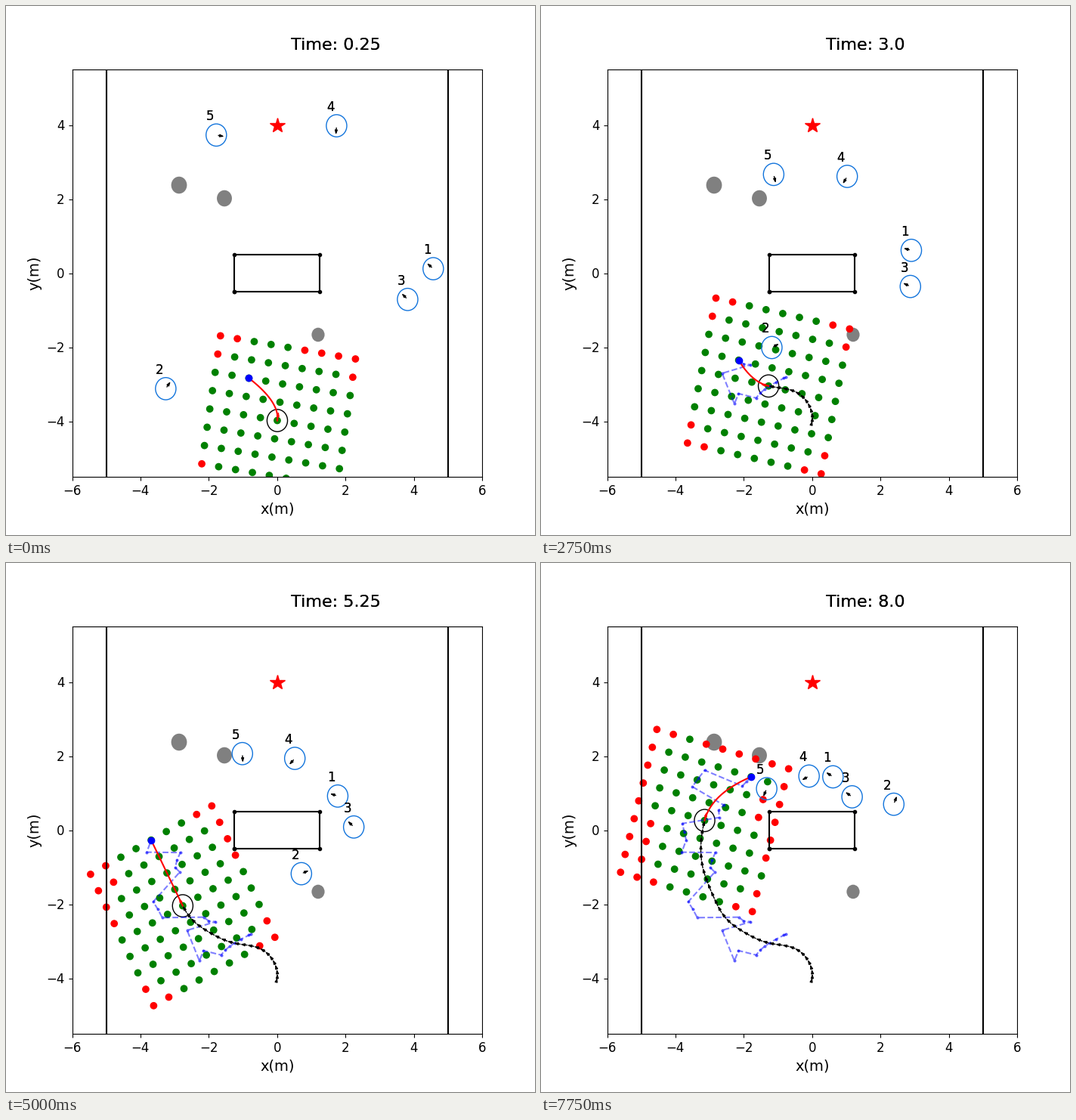
A matplotlib script that plays this animation: 700x700 px, repeating every 8 s.

```python
import numpy as np
import matplotlib.pyplot as plt
from matplotlib.animation import FuncAnimation
from matplotlib.patches import ArrowStyle, Circle, FancyArrowPatch

STEPS = 32
DT = 0.25
RADIUS = 0.3
MARGIN = 0.4
WALL_X = 5
BOX_X, BOX_Y = 1.25, 0.5
OBSTACLES = [(-2.87, 2.377, 0.23), (-1.543, 2.02, 0.22), (1.2, -1.663, 0.19)]
HEAD = ArrowStyle("-|>", head_length=3, head_width=1)
HUMAN_COLOR = "#1274dc"

steps = np.arange(STEPS + 1)


def unit(deg):
    rad = np.radians(deg)
    return np.stack([np.cos(rad), np.sin(rad)], axis=-1)


def hermite(t, keys, pts, slopes):
    i = np.clip(np.searchsorted(keys, t, side="right") - 1, 0, len(keys) - 2)
    h = (keys[i + 1] - keys[i])[:, None]
    u = (t - keys[i])[:, None] / h
    return ((1 + 2 * u) * (1 - u) ** 2 * pts[i]
            + u * (1 - u) ** 2 * h * slopes[i]
            + u * u * (3 - 2 * u) * pts[i + 1]
            + u * u * (u - 1) * h * slopes[i + 1])


def travel(keys, pts, slopes):
    """Position and facing at every step of a smooth path."""
    pos = hermite(steps, keys, pts, slopes)
    move = hermite(steps + 1e-3, keys, pts, slopes) - pos
    return pos, move / np.linalg.norm(move, axis=1, keepdims=True)


# Robot waypoints: step, x, y, heading
way = np.array([(0, 0, -4, 78), (1, 0.005, -3.98, 81),
                (8, -0.503, -3.194, 157), (12, -1.275, -3.047, 168),
                (17, -2.205, -2.633, 149.3), (21, -2.763, -2.043, 117.5),
                (25, -3.136, -1.224, 110.8), (32, -3.147, 0.26, 74.6)])
speed = np.interp(way[:, 0], [0, 1, 8, 21], [0.02, 0.1, 0.18, 0.215])
robot, ahead = travel(way[:, 0], way[:, 1:3],
                      speed[:, None] * unit(way[:, 3]))

# Chosen subgoal at each step, as (forward, left) of the robot
HARD_LEFT, LEFT, AHEAD = (1, 1), (1.5, 1), (2, 0)
NEAR, RIGHT = (1, -0.5), (1.5, -1)
node = np.array([HARD_LEFT] * 7 + [LEFT] * 2 + [AHEAD] + [NEAR] * 3
                + [AHEAD] * 3 + [RIGHT] * 4 + [AHEAD] * 4
                + [RIGHT] * 3 + [AHEAD] * 3 + [RIGHT] * 3)


def to_world(k, local):
    fx, fy = ahead[k]
    return robot[k] + local @ np.array([(fx, fy), (-fy, fx)])


goals = np.array([to_world(k, node[k]) for k in steps])

axis = np.linspace(-2, 2, 9)
grid = np.array([(f, l) for f in axis for l in axis])
too_far = np.hypot(*grid.T) > 2.49


def blocked(pts):
    x, y = pts.T
    bad = too_far | (np.abs(x) > WALL_X - MARGIN)
    bad |= np.hypot(np.maximum(np.abs(x) - BOX_X, 0),
                    np.maximum(np.abs(y) - BOX_Y, 0)) < MARGIN
    for ox, oy, r in OBSTACLES:
        bad |= np.hypot(x - ox, y - oy) < r + MARGIN
    return bad


# Humans: starting direction and a few waypoints at shared steps
human_keys = np.array([1, 8, 17, 25, 32])
HUMANS = [
    (141, [(4.57, 0.12), (3.48, 0.46), (2.24, 0.79), (1.34, 1.07),
           (0.61, 1.44)]),
    (54, [(-3.26, -3.12), (-2.01, -2.42), (-0.11, -1.5), (1.45, -0.74),
          (2.39, 0.7)]),
    (137, [(3.82, -0.71), (3.15, -0.47), (2.56, -0.18), (1.89, 0.39),
           (1.17, 0.9)]),
    (265, [(1.74, 3.98), (1.27, 3.03), (0.74, 2.2), (0.3, 1.73),
           (-0.09, 1.46)]),
    (350, [(-1.78, 3.73), (-1.27, 3.04), (-1.05, 2.26), (-1.05, 1.85),
           (-1.33, 1.12)]),
]


def walk(start_dir, pts):
    pts = np.array(pts)
    slopes = np.gradient(pts, human_keys, axis=0, edge_order=2)
    slopes[0] = np.linalg.norm(slopes[0]) * unit(start_dir)
    return travel(human_keys, pts, slopes)


humans = [walk(*h) for h in HUMANS]

# Static scene
fig, ax = plt.subplots(figsize=(7, 7), dpi=100)
ax.set_xlim(-6, 6)
ax.set_ylim(-5.5, 5.5)
ax.tick_params(labelsize=12)
ax.set_xlabel("x(m)", fontsize=14)
ax.set_ylabel("y(m)", fontsize=14)
for side in (-WALL_X, WALL_X):
    ax.plot([side, side], [-6, 6], color="black")
ax.plot(BOX_X * np.array([-1, 1, 1, -1, -1]),
        BOX_Y * np.array([-1, -1, 1, 1, -1]), "k.-")
ax.plot([0], [4], color="red", marker="*", linestyle="None", markersize=15)
for ox, oy, r in OBSTACLES:
    ax.add_patch(Circle((ox, oy), r, color="gray", lw=0))

live = []


def arrow(start, end, color="black", shrink=2, z=3):
    live.append(ax.add_patch(FancyArrowPatch(
        start, end, color=color, arrowstyle=HEAD,
        shrinkA=shrink, shrinkB=shrink, zorder=z)))


def ring(center, color):
    live.append(ax.add_patch(Circle(center, RADIUS, fill=False, ec=color)))


def label(x, y, text, size):
    # Drawn twice for a slightly heavier look
    live.extend(ax.text(x, y, text, fontsize=size) for _ in range(2))


def draw(frame):
    while live:
        live.pop().remove()
    k = frame + 1

    pts = to_world(k, grid)
    colors = np.where(blocked(pts), "red", "green")
    live.append(ax.scatter(*pts.T, c=colors, zorder=1))

    ring(robot[k], "black")
    for i, (pos, facing) in enumerate(humans, 1):
        x, y = pos[k]
        ring((x, y), HUMAN_COLOR)
        arrow(pos[k], pos[k] + RADIUS * facing[k])
        label(x - 0.3, y + 0.4, str(i), 12)

    if frame:
        live.extend(ax.plot(*goals[:k + 1].T, "b.--", alpha=0.5, markersize=4))
        for a, b in zip(robot[:k], robot[1:k + 1]):
            arrow(a, b, shrink=0, z=2.2)

    # Parabola leaving the robot along its heading
    u = np.linspace(0, 1, 30)
    curve = to_world(k, np.stack([u, u * u], axis=1) * node[k])
    live.extend(ax.plot(*curve.T, color="red", zorder=2.1))
    arrow(robot[k], robot[k] + RADIUS * ahead[k], "red", z=2.1)
    live.append(ax.scatter(*goals[k], c="blue", zorder=2.5))

    label(0.4, 6.04, f"Time: {k * DT}", 16)
    return live


anim = FuncAnimation(fig, draw, frames=STEPS, interval=1000 * DT,
                     init_func=lambda: live, repeat=True, repeat_delay=0)
plt.show()
```
